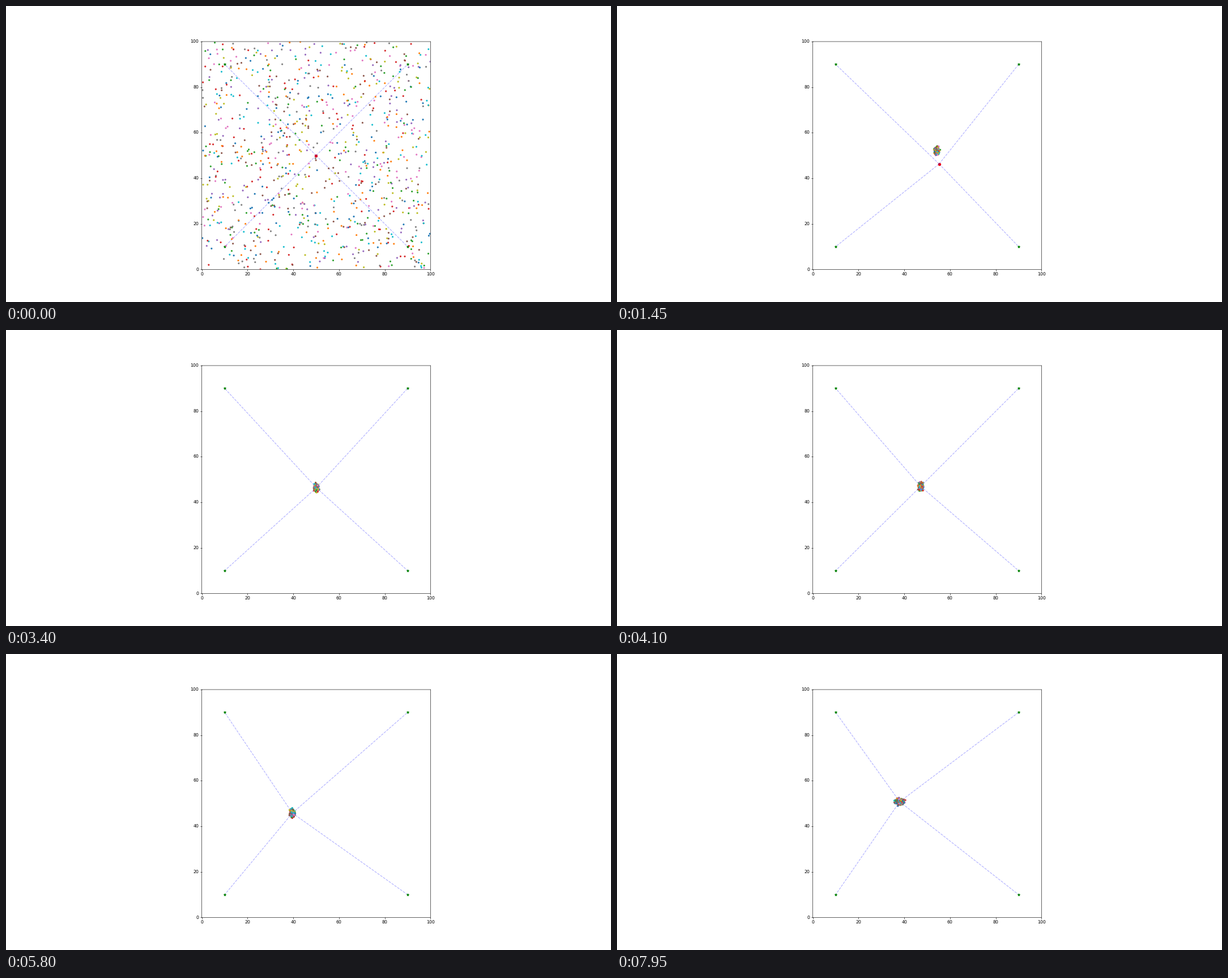
Write a matplotlib script that moves like this. It is 1068x524 px and loops after 8000 ms.

```python
import numpy as np
import matplotlib.pyplot as plt
from matplotlib.animation import FuncAnimation

WIDTH, HEIGHT, DPI = 1068, 524, 55.625
BOX = 345.65, 57.64, 403.65, 403.36  # left, bottom, width, height in pixels
FRAMES, INTERVAL = 160, 50
COUNT = 1000
LANDMARKS = [(x, y) for x in (10, 90) for y in (10, 90)]

# Step and position at a few points of the robot's route
ROUTE = [(0, 50, 50), (29, 55.24, 46.3), (48, 53.9, 43.6), (68, 50.1, 46.4),
         (96, 44.1, 46.8), (116, 39.6, 45.8), (138, 35.3, 47.4), (159, 38, 50.8)]


def smooth_path(keys):
    """Cubic Hermite curve through the keys, sampled at every step."""
    keys = np.array(keys, float)
    times, points = keys[:, 0], keys[:, 1:]
    slopes = np.gradient(points, times, axis=0)
    steps = np.arange(FRAMES)
    i = np.clip(np.searchsorted(times, steps, side="right") - 1, 0, len(times) - 2)
    span = (times[i + 1] - times[i])[:, None]
    u = (steps - times[i])[:, None] / span
    return ((2 * u**3 - 3 * u**2 + 1) * points[i]
            + (u**3 - 2 * u**2 + u) * span * slopes[i]
            + (3 * u**2 - 2 * u**3) * points[i + 1]
            + (u**3 - u**2) * span * slopes[i + 1])


def cloud_offset(step):
    """Early error of the estimate, which builds up and then fades."""
    return np.array([-1, 5.8]) * np.exp(-((step - 29) / 16) ** 2)


def cloud_spread(step):
    """Quick collapse to a tall cloud that widens near the end."""
    u = np.clip((step - 110) / 50, 0, 1)
    ease = u * u * (3 - 2 * u)
    return np.array([0.4 + 0.36 * ease, 0.7 - 0.15 * ease]) + 3 * np.exp(-step / 2)


def simulate_cloud(path):
    """Particle positions at every step: scattered first, then resampled."""
    rng = np.random.default_rng(7)
    cloud = [rng.uniform(0, 100, (COUNT, 2))]
    survivors = rng.normal(size=(14, 2))
    shape = survivors[rng.integers(len(survivors), size=COUNT)]
    for step in range(1, FRAMES):
        shape = shape + rng.normal(scale=0.4, size=shape.shape)
        weights = np.exp(-(shape**2).sum(axis=1) / 8)
        shape = shape[rng.choice(COUNT, COUNT, p=weights / weights.sum())]
        shape = (shape - shape.mean(axis=0)) / shape.std(axis=0)
        cloud.append(path[step] + cloud_offset(step) + shape * cloud_spread(step))
    return cloud


robot_path = smooth_path(ROUTE)
cloud_path = simulate_cloud(robot_path)

plt.rcParams["text.hinting"] = "no_hinting"
fig = plt.figure(figsize=((WIDTH + 0.01) / DPI, (HEIGHT + 0.01) / DPI), dpi=DPI)
left, bottom, width, height = BOX
ax = fig.add_axes([left / WIDTH, bottom / HEIGHT, width / WIDTH, height / HEIGHT])
ax.set_xlim(0, 100)
ax.set_ylim(0, 100)
ax.set_xticks(range(0, 101, 20))
ax.set_yticks(range(0, 101, 20))
for spine in ax.spines.values():
    spine.set_snap(False)

robot, = ax.plot([], [], "ro")
rays = [ax.plot([], [], "b--", alpha=0.3)[0] for _ in LANDMARKS]
ax.plot(*zip(*LANDMARKS), "g*")
particles = ax.scatter(*cloud_path[0].T, s=36, marker=".", linewidths=1,
                       c=[f"C{i % 10}" for i in range(COUNT)],
                       snap=False, zorder=2.2)


def update(step):
    x, y = robot_path[step]
    robot.set_data([x], [y])
    for ray, (lx, ly) in zip(rays, LANDMARKS):
        ray.set_data([x, lx], [y, ly])
    particles.set_offsets(cloud_path[step])
    return [robot, *rays, particles]


anim = FuncAnimation(fig, update, frames=FRAMES, interval=INTERVAL,
                     repeat=True, blit=False)
plt.show()
```
